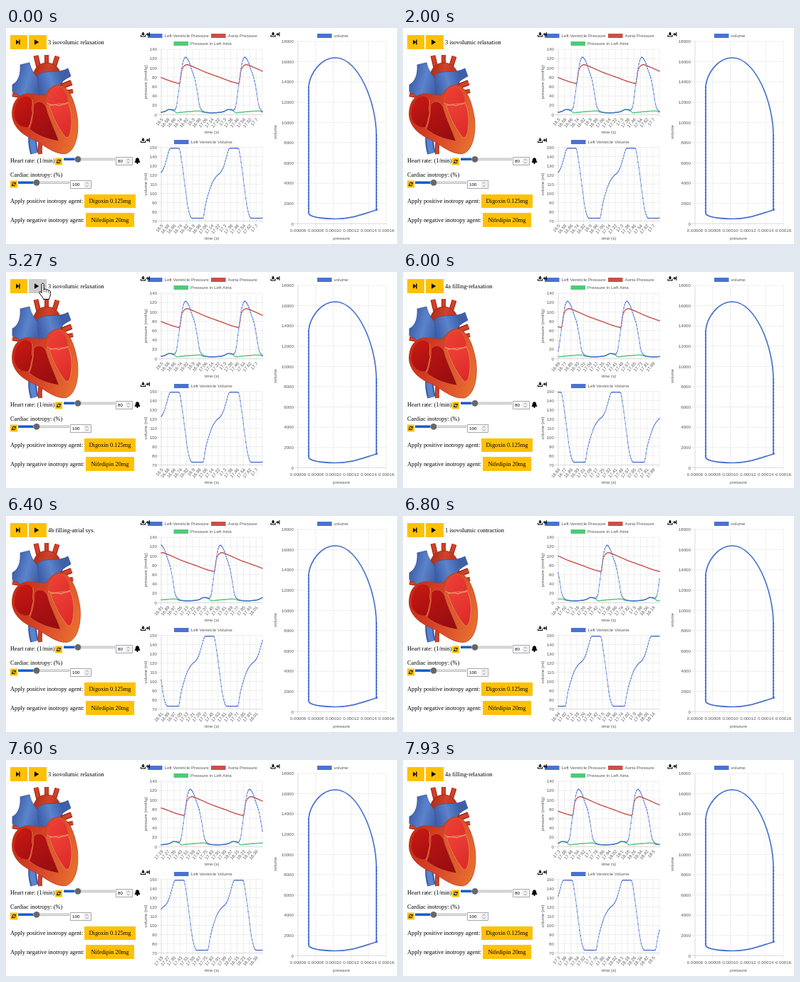
Write an HTML page with a canvas that moves like this. It is 549 px wide and 305 px high and loops after 8 s.

```html
<!DOCTYPE html>
<html lang="en">
<head>
<meta charset="utf-8">
<title>Heart cycle simulator</title>
<style>
html, body { margin: 0; width: 100%; height: 100%; overflow: hidden; background: #fff; }
canvas { display: block; width: 549px; height: 305px; }
</style>
</head>
<body>
<canvas id="stage"></canvas>
<script>
const W = 549, H = 305, LOOP = 8000, FPS = 15;
const SERIF = '8.35px "Liberation Serif", serif';
const SANS = '6.2px "Liberation Sans", sans-serif';
const BLUE = '#4a72d0', RED = '#c8504a', GREEN = '#4fcb78', YELLOW = '#ffc107';
const PX_PER_S = 110.94, PERIOD = 83.2, STEP = PX_PER_S / 100;
const START = 16.5, SPAN = 128;

const canvas = document.getElementById('stage');
const dpr = window.devicePixelRatio || 1;
canvas.width = W * dpr;
canvas.height = H * dpr;
const c = canvas.getContext('2d');

// ---- helpers ----
function rect(x, y, w, h, color) { c.fillStyle = color; c.fillRect(x, y, w, h); }

function text(s, x, y, font = SERIF, color = '#000', align = 'left') {
  c.font = font;
  c.fillStyle = color;
  c.textAlign = align;
  c.fillText(s, x, y);
}

function turned(s, x, y, angle, align) {
  c.save();
  c.translate(x, y);
  c.rotate(angle);
  text(s, 0, 2, SANS, '#555', align);
  c.restore();
}

function line(x1, y1, x2, y2, color, width = 1) {
  c.strokeStyle = color;
  c.lineWidth = width;
  c.beginPath();
  c.moveTo(x1, y1);
  c.lineTo(x2, y2);
  c.stroke();
}

function shape(d, fill, edge, width = 1) {
  const p = new Path2D(d);
  if (fill) { c.fillStyle = fill; c.fill(p); }
  if (edge) { c.strokeStyle = edge; c.lineWidth = width; c.stroke(p); }
}

function shade(x1, y1, x2, y2, ...colors) {
  const g = c.createLinearGradient(x1, y1, x2, y2);
  colors.forEach((col, i) => g.addColorStop(i / (colors.length - 1), col));
  return g;
}

function disc(x, y, r, color) {
  c.fillStyle = color;
  c.beginPath();
  c.arc(x, y, r, 0, 7);
  c.fill();
}

// Monotone cubic through [x, value] pairs, periodic in x.
function cycle(pts) {
  const n = pts.length;
  const slope = i => (pts[i + 1][1] - pts[i][1]) / (pts[i + 1][0] - pts[i][0]);
  const tangent = i => {
    const a = slope(i ? i - 1 : n - 2), b = slope(i < n - 1 ? i : 0);
    return a * b <= 0 ? 0 : 2 * a * b / (a + b);
  };
  const tan = pts.map((_, i) => tangent(i));
  return x => {
    x = ((x % PERIOD) + PERIOD) % PERIOD;
    let i = 0;
    while (i < n - 2 && x > pts[i + 1][0]) i++;
    const [x0, y0] = pts[i], [x1, y1] = pts[i + 1], h = x1 - x0, u = (x - x0) / h;
    return y0 + (y1 - y0) * u * u * (3 - 2 * u)
      + h * u * (1 - u) * (tan[i] * (1 - u) - tan[i + 1] * u);
  };
}

// ---- physiology over one beat ----
const ventricle = cycle([[0, 9.5], [3, 16], [6, 46], [10, 91], [13, 115], [16, 123], [20, 116],
  [25, 95], [29, 77], [33, 45], [36, 18], [40, 8], [45, 5], [54, 4], [64, 5], [70, 7],
  [76, 11], [80, 11], [PERIOD, 9.5]]);
const aorta = cycle([[0, 69.5], [8, 67], [11, 95], [14, 104], [18, 107], [22, 105.5], [26, 103],
  [30, 100.5], [44, 91], [64, 80], [PERIOD, 69.5]]);
const atrium = cycle([[0, 8], [4, 4], [9, 5], [19, 6.5], [36, 8], [40, 6], [45, 4.5], [54, 4],
  [64, 5], [70, 7], [76, 11], [80, 10], [PERIOD, 8]]);
const volume = cycle([[0, 149], [7, 149], [8, 147], [11, 133], [15, 110], [19, 87], [22, 77],
  [25, 73], [40.5, 73], [44, 87], [48, 99], [54, 112], [60, 119], [65, 122.5], [69, 128],
  [73, 138], [77, 148], [78.5, 149], [PERIOD, 149]]);

const STAGES = [[7, '1 isovolumic contraction'], [25, '2 systole-ejection'],
  [41.2, '3 isovolumic relaxation'], [66, '4a filling-relaxation'],
  [78, '4b filling-atrial sys.'], [PERIOD, '1 isovolumic contraction']];

// ---- charts ----
function legend(x, y, color, label) {
  rect(x, y, 20.5, 6, color);
  text(label, x + 23.5, y + 5.3, SANS, '#555');
}

function gridY(x0, x1, y0, y1, from, to, step) {
  for (let v = from; v <= to; v += step) {
    const y = y0 + (y1 - y0) * (v - from) / (to - from);
    line(x0 - 5, y, x1, y, v === from ? '#ccc' : '#e7e7e7', 0.7);
    text(String(v), x0 - 6, y + 2.2, SANS, '#555', 'right');
  }
}

function exportIcons(x, y) {
  shape(`M${x + 2} ${y}h2v2.2h1.6l-2.6 2.6l-2.6 -2.6h1.6z`, '#000');
  shape(`M${x} ${y + 4}v2h6v-2`, null, '#000', 1.2);
  rect(x + 7, y + 2.2, 3, 1.2, '#000');
  shape(`M${x + 9} ${y + 0.4}l2.4 2.4l-2.4 2.4z`, '#000');
  rect(x + 11.3, y, 1.1, 5.8, '#000');
}

function trace(f, shift, toY, color) {
  const pts = [];
  for (let i = 0; i <= SPAN; i++) pts.push([218 + i * STEP, toY(f(i * STEP + shift))]);
  c.strokeStyle = color;
  c.lineWidth = 0.6;
  c.beginPath();
  pts.forEach(p => c.lineTo(...p));
  c.stroke();
  pts.forEach(p => disc(...p, 0.8, color));
}

function timeChart(top, bottom, from, to, step, title, offset, series) {
  for (let i = 0; i <= SPAN; i += 8) {
    const x = 218 + i * STEP;
    line(x, top, x, bottom + 4, i ? '#e7e7e7' : '#ccc', 0.7);
    if (i < SPAN) {
      const label = String(+(START + offset + i / 100).toFixed(2));
      turned(label, x + 1.5, bottom + 5.5, -0.87, 'right');
    }
  }
  gridY(218, 360, bottom, top, from, to, step);
  turned(title, 196, (top + bottom) / 2, -Math.PI / 2, 'center');
  text('time (s)', 289, bottom + 26.5, SANS, '#555', 'center');
  const toY = v => bottom + (top - bottom) * (v - from) / (to - from);
  const shift = offset * PX_PER_S - 18;
  for (const [f, color] of series) trace(f, shift, toY, color);
}

function loopChart() {
  for (let i = 0; i <= 5; i++) {
    const x = 410 + i * 24.8;
    line(x, 19, x, 281, i ? '#e7e7e7' : '#ccc', 0.7);
    text((0.00006 + i * 0.00002).toFixed(5), x, 288, SANS, '#555', 'center');
  }
  gridY(410, 534, 276.3, 19, 0, 18000, 2000);
  turned('volume', 378, 147, -Math.PI / 2, 'center');
  text('pressure', 471, 299, SANS, '#555', 'center');
  legend(437, 8, BLUE, 'volume');
  c.lineJoin = 'round';
  shape('M425 262V82C427 65 441 42 463 42C495 43 520 105 520 152V257'
    + 'C500 263 486 269.5 462 269.5C440 269 427 266 425 262Z', null, BLUE, 1.7);
  for (let y = 84; y < 260; y += 4.5) disc(425, y, 1.2, BLUE);
  for (let y = 152; y < 257; y += 4.5) disc(520.2, y, 1.2, BLUE);
  disc(520.3, 256.6, 1.6, BLUE);
  exportIcons(372, 6);
}

// ---- heart ----
function tube(d, width, edge, mid) {
  c.lineCap = 'butt';
  shape(d, null, edge, width);
  shape(d, null, mid, width * 0.62);
}

function drawHeart(fill) {
  const DEEP = '#3f5fa8', SKY = '#5b84cc', RUST = '#a92a16', CORAL = '#d0432a';

  // great vessels
  tube('M50 152C48 162 47 169 48 178', 6, RUST, CORAL);
  tube('M38 148C36 158 37 166 40 177', 12, DEEP, SKY);
  tube('M9 94L27 97', 6, RUST, CORAL);
  tube('M74 84L92 77', 8, RUST, CORAL);
  tube('M78 92L94 89', 6, RUST, CORAL);
  tube('M46 56L42 39', 7, RUST, CORAL);
  tube('M57 54L57 38', 6, RUST, CORAL);
  tube('M67 56L72 40', 7, RUST, CORAL);
  shape('M38 104C33 70 38 50 57 49C74 50 80 62 79 92Z',
    shade(36, 60, 80, 70, RUST, CORAL, RUST), '#9d2816', 0.8);
  shape('M20 52L33 49C35 60 42 67 48 76L46 106L24 104C20 95 15 92 9 90L9 80C17 76 21 66 20 52Z',
    shade(12, 70, 48, 80, DEEP, SKY, DEEP), '#38569c', 0.8);
  shape('M45 66C57 58 74 65 87 57L91 68C80 74 74 78 74 89L70 106H50C46 91 44 78 45 66Z',
    shade(46, 80, 80, 70, DEEP, SKY, DEEP), '#38569c', 0.8);

  // muscle and chambers swell with the filling volume
  c.save();
  c.translate(10, 92);
  c.scale(0.99 + 0.04 * fill, 0.995 + 0.008 * fill);
  c.translate(-10, -92);
  shape('M24 94C13 98 7 111 9 127C12 142 24 151 37 157C52 163 66 179 84 178'
    + 'C99 175 104 148 101 126C98 108 93 92 83 83C72 76 61 84 56 94C46 97 36 90 24 94Z',
    shade(10, 120, 102, 150, '#c62f18', '#d9472a', '#e8702f'), '#b8381b', 0.8);
  shape('M25 97C16 100 11 112 12 125C14 136 23 142 32 140C38 128 39 111 36 101C33 97 29 96 25 97Z',
    shade(12, 100, 36, 136, '#c81a14', '#a80f10'));
  shape('M39 108C46 101 53 104 57 112C61 128 69 143 75 160C61 158 45 153 33 143C37 133 39 121 39 108Z',
    shade(38, 108, 70, 158, '#b81414', '#960d10'), '#d95a34', 0.9);
  shape('M58 105C59 91 67 81 77 83C84 87 87 95 88 104C79 110 67 111 58 105Z',
    shade(58, 84, 88, 108, '#ef4238', '#e0302c'), '#d95a34', 0.8);
  shape('M61 110C69 107 80 107 88 106C93 116 94 132 92 143C91 152 88 157 84 154'
    + 'C75 143 67 128 61 110Z',
    shade(62, 110, 92, 150, '#ee4038', '#dc2a28'), '#e98a4e', 0.9);
  shape('M58 108C62 126 72 146 81 161', null, '#d9602f', 3);
  shape('M58 106C64 111 70 107 75 110C80 107 84 109 88 105', null, '#f0a080', 1);
  shape('M37 101C39 108 35 114 38 120C35 128 36 134 32 141', null, '#e2764a', 1);
  c.restore();
}

// ---- control panel ----
function reset(x, y) {
  rect(x, y, 10, 10, YELLOW);
  c.strokeStyle = '#000';
  c.lineWidth = 1;
  for (const a of [0.3, 3.44]) {
    c.beginPath();
    c.arc(x + 5, y + 5, 2.3, a, a + 2.2);
    c.stroke();
  }
  shape(`M${x + 7.8} ${y + 2}v2.7h-2.7zM${x + 2.2} ${y + 8}v-2.7h2.7z`, '#000');
}

function slider(x, y, thumb) {
  rect(x, y - 1.7, 72, 3.4, '#b0b0b4');
  rect(x + 0.5, y - 0.9, 71, 1.8, '#e6e6e8');
  rect(x, y - 1.7, thumb - x, 3.4, '#0a5fd0');
  disc(thumb, y, 4.7, '#fff');
  disc(thumb, y, 4.4, '#676767');
}

function numberBox(x, y, w, value) {
  c.strokeStyle = '#8f8f9d';
  c.lineWidth = 0.8;
  c.strokeRect(x + 0.5, y + 0.5, w - 1, 11);
  text(value, x + 3, y + 8.3, SANS);
  rect(x + w - 10.5, y + 1.5, 8.5, 9, '#eee');
  const m = x + w - 6.3;
  shape(`M${m - 1.7} ${y + 4.7}l1.7 -1.7l1.7 1.7M${m - 1.7} ${y + 7.3}l1.7 1.7l1.7 -1.7`,
    null, '#777', 0.7);
}

function panel(label, hover) {
  rect(6, 10, 24, 20, YELLOW);
  shape('M14.2 16.5L18.2 20L14.2 23.5Z', '#000');
  rect(18.2, 16.5, 1.4, 7, '#000');
  rect(32, 10, 25, 20, hover ? '#ccc' : YELLOW);
  shape('M40 16.3L46.2 20L40 23.7Z', '#000');
  text(label, 59, 22.5);

  text('Heart rate: (1/min)', 6, 190);
  reset(69, 183.5);
  slider(81, 185.3, 101);
  numberBox(154, 182, 24, '80');
  shape('M184.5 183.2c2.5 .4 2.6 2.500 2.800 4.300l1.200 2.500h-8l1.200 -2.500c.2 -1.800 .3 -3.900 2.800 -4.300z', '#000');
  disc(184.5, 190.8, 1.2, '#000');

  text('Cardiac inotropy: (%)', 6, 210);
  reset(6, 215.5);
  slider(17, 218.3, 43);
  numberBox(90, 215, 30, '100');

  text('Apply positive inotropy agent:', 6, 246.5);
  rect(110, 235, 72, 19, YELLOW);
  text('Digoxin 0.125mg', 146, 247.3, SERIF, '#000', 'center');
  text('Apply negative inotropy agent:', 6, 273.5);
  rect(112, 261, 68, 20, YELLOW);
  text('Nifedipin 20mg', 146, 274.3, SERIF, '#000', 'center');
}

// ---- pointer ----
const REST = [82, 137], PLAY = [50, 16];

function pointerAt(t) {
  if (t < 3730 || t >= 5800) return null;
  const u = t < 5000 ? (t - 4000) / 800 : (5800 - t) / 330;
  const k = Math.min(1, Math.max(0, u)), e = k * k * (3 - 2 * k);
  return REST.map((v, i) => v + (PLAY[i] - v) * e);
}

function pointer([x, y], hand) {
  c.save();
  c.translate(x, y);
  c.lineJoin = 'round';
  if (hand) {
    shape('M0 1.5C0 -.3 3.2 -.3 3.2 1.5V9C3.5 7.6 6.3 7.8 6.3 9.5'
      + 'C7 8.2 9.3 8.7 9.3 10.3C10.2 9.3 12.2 10 12.2 12V16.5'
      + 'C12.2 19 10.5 20 10.5 22.5H2.5C2.5 19.5 -1.5 17 -3.2 13.5'
      + 'C-3.8 11.5 -2 10.8 0 13.5Z', '#fff', '#000', 1);
    shape('M3.2 9V12.5M6.3 10V13M9.3 11V13.5', null, '#000', 0.7);
  } else {
    shape('M0 0V15.5L3.6 12.2L6 17.8L8.4 16.7L6 11.3H10.8Z', '#fff', '#000', 0.9);
  }
  c.restore();
}

// ---- scene ----
function draw(t) {
  const offset = Math.round(Math.max(0, t - 5410) * 0.03153) / 100;
  const now = (offset * PX_PER_S + SPAN * STEP - 18) % PERIOD;
  const label = STAGES.find(s => now < s[0])[1];
  const mouse = pointerAt(t);
  const hover = !!mouse && mouse[0] < 57 && mouse[1] < 30;

  c.setTransform(dpr, 0, 0, dpr, 0, 0);
  rect(0, 0, W, H, '#fff');
  drawHeart((volume(now) - 73) / 76);
  panel(label, hover);

  timeChart(30, 122.5, 0, 140, 20, 'pressure (mmHg)', offset,
    [[atrium, GREEN], [aorta, RED], [ventricle, BLUE]]);
  legend(199, 8, BLUE, 'Left Ventricle Pressure');
  legend(288, 8, RED, 'Aorta Pressure');
  legend(235.5, 19, GREEN, 'Pressure in Left Atria');
  exportIcons(189.5, 6);

  timeChart(168.5, 272.5, 70, 150, 10, 'volume (ml)', offset, [[volume, BLUE]]);
  legend(236, 158, BLUE, 'Left Ventricle Volume');
  exportIcons(189.5, 155.5);

  loopChart();
  if (mouse) pointer(mouse, hover);
}

function frame() {
  const t = performance.now() % LOOP;
  draw(Math.floor(t * FPS / 1000 + 0.1) * 1000 / FPS);
  requestAnimationFrame(frame);
}
frame();
</script>
</body>
</html>
```
